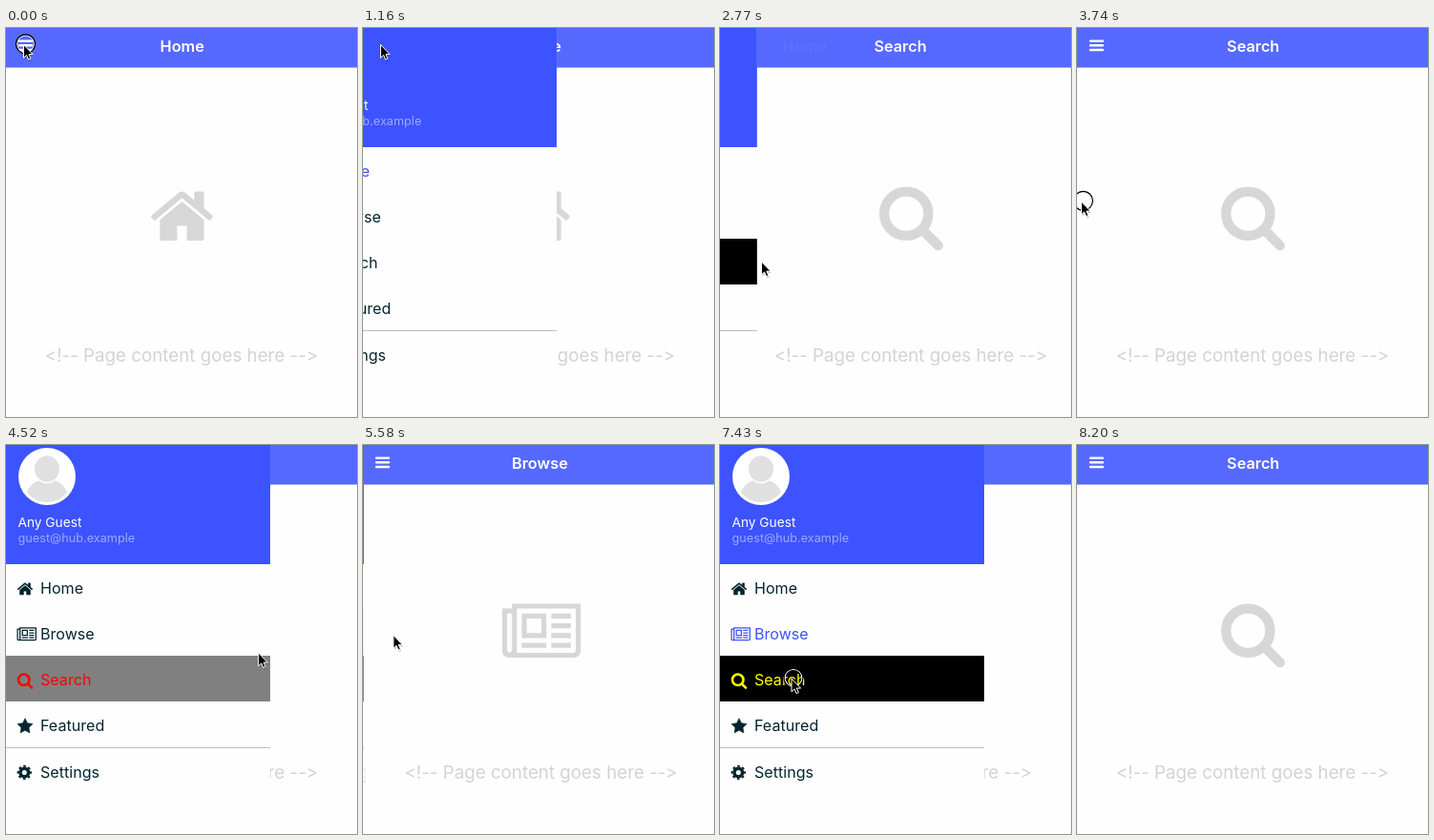
An HTML page that plays this animation: 368 by 408 pixels, repeating every 8.37 s.

```html
<!DOCTYPE html>
<html lang="en">
<head>
<meta charset="utf-8">
<title>Side drawer</title>
<style>
  html, body { margin: 0; width: 100%; height: 100%; overflow: hidden; background: #fefefe; }
  svg { display: block; width: 368px; height: 408px; overflow: hidden; }
  text { font-family: Inter, "Open Sans", sans-serif; font-variant-ligatures: none; font-feature-settings: "calt" 0; white-space: pre; }
  .title { font-size: 16.3px; font-weight: 600; fill: #fff; text-anchor: middle; }
  .note { font-size: 18.75px; fill: #d3d3d3; text-anchor: middle; }
  .label { font-size: 16.1px; fill: currentColor; }
</style>
</head>
<body>
<svg id="stage" viewBox="0 0 368 408">
  <defs>
    <g id="home" fill="currentColor">
      <path d="M320 992V1472q0 64 64 64h384v-384h256v384h384q64 0 64-64V992L896 518z"/>
      <path d="M1695 923l-62 74q-21 22-45 4L896 424 204 1001q-24 18-45-4l-62-74q-16-24 4-45L820 279q76-52 152 0l244 204V288q0-32 32-32h192q32 0 32 32v408l219 182q20 21 4 45z"/>
    </g>
    <g id="search" fill="none" stroke="currentColor" stroke-width="256" stroke-linecap="round">
      <circle cx="768" cy="832" r="576"/>
      <path d="M1190 1254L1600 1664"/>
    </g>
    <path id="browse" fill="currentColor" fill-rule="evenodd" d="M256 128H2048V1344q0 192-192 192H192q-192 0-192-192V256H256zM128 384H256V1344q-64 128-128 0zM384 256H1920V1344q0 64-64 64H384zM512 384h640v640H512zM640 512v384h384V512zM512 1152h640v128H512zM1280 384h512v128h-512zM1280 640h512v128h-512zM1280 896h512v128h-512zM1280 1152h512v128h-512z"/>
    <path id="featured" fill="currentColor" stroke="currentColor" stroke-width="60" stroke-linejoin="round" d="M896 70l247 502 556 80-402 392 95 552-496-261-496 261 95-552L93 652l556-80z"/>
    <g id="settings" fill="none" stroke="currentColor">
      <circle cx="896" cy="896" r="430" stroke-width="350"/>
      <circle cx="896" cy="896" r="670" stroke-width="190" pathLength="16" stroke-dasharray="1" stroke-dashoffset=".5"/>
    </g>
    <clipPath id="face"><circle cx="43" cy="33" r="27"/></clipPath>
  </defs>

  <g id="pages"></g>
  <rect width="368" height="41.5" fill="#5569ff"/>
  <path d="M14 13.6h13M14 18.3h13M14 23h13" stroke="#fff" stroke-width="2.4" stroke-linecap="round"/>
  <g id="titles"></g>

  <g id="drawer">
    <rect width="277" height="408" fill="#fefefe"/>
    <rect width="277" height="125" fill="#3c53ff"/>
    <circle cx="43" cy="33" r="30" fill="#fff"/>
    <g clip-path="url(#face)" fill="#e0e0e0" stroke="#fff" stroke-width="1.6">
      <ellipse cx="43" cy="53" rx="22" ry="18"/>
      <ellipse cx="43" cy="25" rx="13.8" ry="14.6"/>
    </g>
    <text x="12.5" y="86" font-size="13.7" fill="#fff">Any Guest</text>
    <text x="12.5" y="102" font-size="12.7" fill="#9ba8ff">guest@hub.example</text>
    <g id="rows"></g>
    <rect y="317" width="277" height="1" fill="#bdbdbd"/>
  </g>

  <g id="cursor">
    <g id="ring" fill="none" stroke-width="1.2">
      <circle cx="2" cy="-.7" r="9" stroke="#fff"/>
      <circle cx="2" cy="-.7" r="10" stroke="#000"/>
    </g>
    <path d="M1 2V15.5L4 12.7 6 17.4 8.2 16.4 6.2 11.9H10.5z" fill="#000" opacity=".22"/>
    <path d="M0 0V13.8L3.1 10.9 5.1 15.6 7.4 14.6 5.4 10.1H9.6z" fill="#000" stroke="#fff"/>
  </g>
</svg>
<script>
const LOOP = 8370, WIDTH = 368, DRAWER = 277, EDGE = 4.5;
const BLUE = '#3c53ff', DARK = '#04252f';
const $ = id => document.getElementById(id);

// Each page slides in over the previous one at its start time.
const pages = [
  { name: 'Home', at: -1000 },
  { name: 'Search', at: 2510 },
  { name: 'Browse', at: 5240 },
  { name: 'Search', at: 7560 }
];
const rows = ['Home', 'Browse', 'Search', 'Featured', 'Settings'];
const iconWidth = { Browse: 2048 };
const selected = [[0, 'Home'], [2900, 'Search'], [5640, 'Browse'], [8000, 'Search']];
const pressed = [[2410, 2900, 'Search'], [5140, 5640, 'Browse'], [7430, 8000, 'Search']];
const touches = [[0, 90], [2410, 2500], [3720, 4200], [5140, 5230], [6010, 6660], [7430, 7510]];

// time, x, y of the pointer tip
const path = [
  [0, 18.5, 17.5], [1425, 18.5, 17.5], [1620, 46, 75], [1800, 65, 155],
  [2050, 43.5, 245], [2770, 43.5, 245], [3210, 14, 200], [3390, 14, 200],
  [3650, EDGE, 182], [3740, EDGE, 182], [4250, 331.5, 203], [4520, 265, 218],
  [4960, 67, 192], [5300, 67, 192], [5580, 32, 199.5], [5930, EDGE, 186],
  [6010, EDGE, 186], [6560, 237, 200], [6660, 237, 200], [7330, 75, 245],
  [7640, 75, 245], [8160, 110, 425], [LOOP, 110, 425]
];

const clamp = (v, a = 0, b = 1) => Math.min(b, Math.max(a, v));
const span = (t, from, to) => clamp((t - from) / (to - from));
const inOut = u => u < .5 ? 2 * u * u : 1 - 2 * (1 - u) ** 2;
const out = u => 1 - (1 - u) ** 4;
const within = (t, [from, to]) => t >= from && t < to;

// Monotone cubic through the pointer path.
function pointer(t, axis) {
  const slope = i => (path[i + 1][axis] - path[i][axis]) / (path[i + 1][0] - path[i][0]);
  const tangent = i => {
    if (i < 1 || i > path.length - 2) return 0;
    const a = slope(i - 1), b = slope(i);
    return a * b <= 0 ? 0 : 2 * a * b / (a + b);
  };
  const next = path.findIndex(p => p[0] > t);
  const i = next < 0 ? path.length - 2 : next - 1;
  const [a, b] = [path[i], path[i + 1]];
  const h = b[0] - a[0], u = (t - a[0]) / h, w = 1 - u;
  return (1 + 2 * u) * w * w * a[axis] + u * w * w * h * tangent(i)
    + u * u * (3 - 2 * u) * b[axis] - u * u * w * h * tangent(i + 1);
}

function drawerShown(t, x) {
  const close = from => DRAWER * (1 - inOut(span(t, from, from + 355)));
  const drag = clamp(x - EDGE, 0, DRAWER);
  if (t < 2400) return DRAWER * inOut(span(t, 850, 1340));
  if (t < 3740) return close(2510);
  if (t < 4250) return drag;
  if (t < 6010) return close(5240);
  if (t < 6660) return drag;
  if (t < 7400) {
    const held = 237 - EDGE;
    return held + (DRAWER - held) * out(span(t, 6660, 6920));
  }
  return close(7560);
}

function add(parent, markup) {
  parent.insertAdjacentHTML('beforeend', markup);
  return parent.lastElementChild;
}

function icon(name, cx, y, scale) {
  const x = cx - (iconWidth[name] || 1792) / 2 * scale;
  return `<use href="#${name.toLowerCase()}" transform="translate(${x} ${y}) scale(${scale})"/>`;
}

for (const page of pages) {
  page.body = add($('pages'), `<g color="#d7d7d7"><rect width="${WIDTH}" height="408" fill="#fefefe"/>
    ${icon(page.name, 184.5, 161.3, .0402)}
    <text class="note" x="184" y="349.5">&lt;!-- Page content goes here --&gt;</text></g>`);
  page.title = add($('titles'), `<text class="title" x="184.7" y="25">${page.name}</text>`);
}

const items = rows.map((name, i) => {
  const y = 125 + 48 * i + (i > 3 ? .5 : 0);
  const cx = name === 'Browse' ? 21.7 : name === 'Settings' ? 19.3 : 20;
  const el = add($('rows'), `<g><rect y="${y}" width="${DRAWER}" height="48"/>
    ${icon(name, cx, y + 17, .01)}
    <text class="label" x="36" y="${y + 31}">${name}</text></g>`);
  return { name, el, back: el.firstElementChild };
});

function rowStyle(name, active, down) {
  if (name === 'Search') {
    if (down) return ['#000', '#ff0'];
    if (active) return ['#808080', '#f00'];
  }
  return [down ? '#f0f0f0' : 'none', active ? BLUE : DARK];
}

function draw(t) {
  const x = pointer(t, 1), y = pointer(t, 2);
  const entered = pages.map(p => out(span(t, p.at, p.at + 480)));
  pages.forEach((p, i) => {
    const enter = entered[i], leave = entered[i + 1] || 0;
    p.body.setAttribute('transform', `translate(${WIDTH * (1 - enter) - 110 * leave})`);
    p.title.setAttribute('transform', `translate(${100 * (1 - enter) - 100 * leave})`);
    p.title.setAttribute('opacity', enter * (1 - leave));
  });

  const current = selected.filter(s => s[0] <= t).pop()[1];
  const press = pressed.find(p => within(t, p));
  for (const { name, el, back } of items) {
    const [fill, color] = rowStyle(name, name === current, !!press && press[2] === name);
    back.setAttribute('fill', fill);
    el.setAttribute('color', color);
  }

  $('drawer').setAttribute('transform', `translate(${drawerShown(t, x) - DRAWER})`);
  $('cursor').setAttribute('transform', `translate(${x} ${y})`);
  $('ring').setAttribute('visibility', touches.some(s => within(t, s)) ? 'visible' : 'hidden');
}

const start = performance.now();
function tick() {
  draw((performance.now() - start) % LOOP);
  requestAnimationFrame(tick);
}
tick();
</script>
</body>
</html>
```
